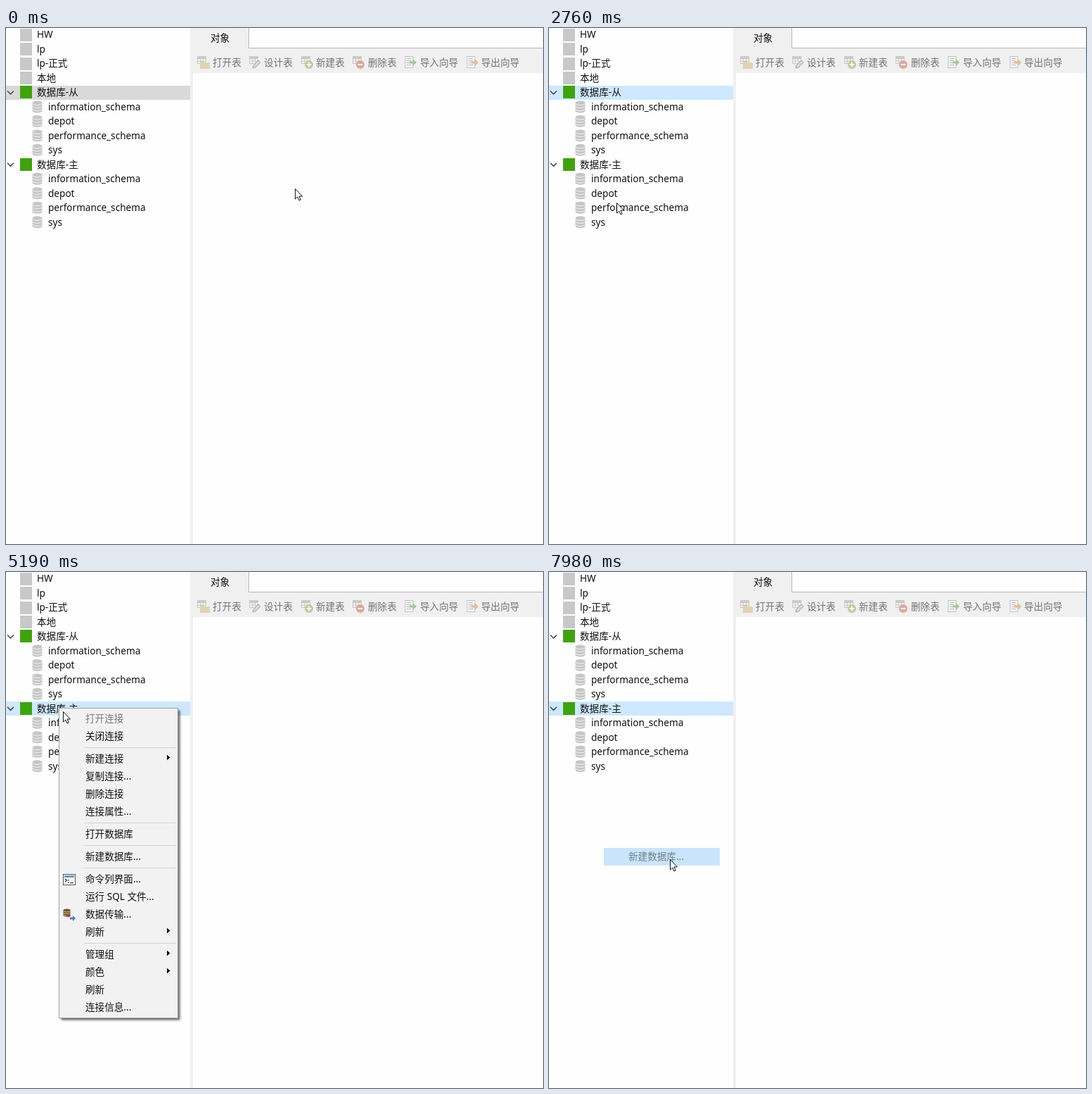
These frames come from a looping animation (764 px wide and 733 px high, 8 s). An HTML page with a canvas:

```html
<!DOCTYPE html>
<html lang="zh-CN">
<head>
<meta charset="utf-8">
<title>数据库连接</title>
<style>
  html, body { margin: 0; width: 764px; height: 733px; overflow: hidden; background: #fefefe; }
  canvas { display: block; }
</style>
</head>
<body>
<canvas id="stage" width="764" height="733"></canvas>
<script>
const ctx = document.getElementById('stage').getContext('2d');
const LOOP = 8000, STEP = 77.5;
const FONT_SIZE = 13.6;
const FONT = `${FONT_SIZE}px "Noto Sans", "Noto Sans CJK SC", "Noto Sans CJK", sans-serif`;
const ROW_TOP = 9.6, ROW_H = 20.47;
const MENU_W = 170, ITEM_H = 25, SEP_H = 7, PAD = 3;
const OPEN_DELAY = 240, CLOSE_DELAY = 140, FADE_STEP = 70;

// Pointer strokes: start, end, x, y. It rests between them.
const strokes = [
  [70, 460, 36, 116], [610, 760, 68, 93], [1000, 1380, 112, 186], [1450, 1840, 133, 501],
  [2290, 2910, 88, 195], [3150, 3310, 111, 238], [3380, 3710, 146, 526], [3780, 4090, 158, 590],
  [4390, 4710, 75, 193], [5110, 5190, 81, 198], [5270, 5880, 150, 366], [5950, 6100, 163, 430],
  [6180, 6340, 163, 372], [6660, 6900, 166, 340], [7050, 7430, 172, 408]
];

function pointerAt(t) {
  const time = Math.floor((t + 36) / STEP) * STEP;
  let x = 411, y = 228;
  for (const [start, end, toX, toY] of strokes) {
    if (t < start) break;
    const f = Math.min(1, (time - start + STEP) / (end - start + STEP));
    x += (toX - x) * f;
    y += (toY - y) * f;
  }
  return [Math.round(x), Math.round(y)];
}

// A menu opens where the pointer was when its row was clicked.
function contextMenu(click, pick) {
  const [x, y] = pointerAt(click);
  const row = Math.round((y - ROW_TOP) / ROW_H);
  return { x, y, row, click, open: click + OPEN_DELAY, pick, close: pick + CLOSE_DELAY };
}
const menus = [contextMenu(760, 2070), contextMenu(2910, 4240), contextMenu(4870, 7770)];

const schemas = ['information_schema', 'depot', 'performance_schema', 'sys'];
const tree = ['HW', 'lp', 'lp-正式', '本地', '数据库-从', ...schemas, '数据库-主', ...schemas];

// "-" is a separator, ">" marks a submenu.
const items = [];
let nextY = PAD;
for (const entry of ['打开连接', '关闭连接', '-', '新建连接>', '复制连接...', '删除连接', '连接属性...', '-',
  '打开数据库', '-', '新建数据库...', '-', '命令列界面...', '运行 SQL 文件...', '数据传输...', '刷新>', '-',
  '管理组>', '颜色>', '刷新', '连接信息...']) {
  const sep = entry === '-';
  items.push({ sep, label: entry.replace('>', ''), sub: entry.endsWith('>'), y: nextY, off: entry === '打开连接' });
  nextY += sep ? SEP_H : ITEM_H;
}
const MENU_H = nextY + PAD;

function rect(x, y, w, h, color) {
  ctx.fillStyle = color;
  ctx.fillRect(x, y, w, h);
}

function text(label, x, y, color = '#111') {
  ctx.font = FONT;
  ctx.fillStyle = color;
  ctx.fillText(label, x, Math.round(y + 4.8));
}

function shape(points, x, y, fill, stroke, width = 1, close = true) {
  ctx.beginPath();
  points.forEach(([px, py]) => ctx.lineTo(x + px, y + py));
  if (close) ctx.closePath();
  if (fill) { ctx.fillStyle = fill; ctx.fill(); }
  if (stroke) { ctx.strokeStyle = stroke; ctx.lineWidth = width; ctx.stroke(); }
}

function disc(x, y, r, color) {
  ctx.fillStyle = color;
  ctx.beginPath();
  ctx.arc(x, y, r, 0, Math.PI * 2);
  ctx.fill();
}

function blockArrow(x, y, size, color) {
  rect(x, y - 1.5, size, 3, color);
  shape([[0, -size], [size, 0], [0, size]], x + size, y, color);
}

function cylinder(x, y, w, h, color, gap) {
  const rx = w / 2, ry = w / 5;
  ctx.fillStyle = color;
  ctx.beginPath();
  ctx.ellipse(x, y - h / 2 + ry, rx, ry, 0, Math.PI, 0);
  ctx.ellipse(x, y + h / 2 - ry, rx, ry, 0, 0, Math.PI);
  ctx.fill();
  ctx.strokeStyle = gap;
  ctx.lineWidth = 1;
  for (let i = 0; i < 3; i++) {
    ctx.beginPath();
    ctx.ellipse(x, y - h / 2 + ry + i * h * 0.24 + 0.5, rx, ry, 0, 0, Math.PI);
    ctx.stroke();
  }
}

function drawTree(t) {
  const active = menus.filter(m => t >= m.click).pop();
  const selected = active ? active.row : tree.indexOf('数据库-从');
  tree.forEach((label, i) => {
    const y = ROW_TOP + i * ROW_H;
    if (i === selected) rect(0, Math.ceil(y - 10), 262, 20, active ? '#cde8ff' : '#d9d9d9');
    if (schemas.includes(label)) {
      cylinder(44.5, y, 14, 17, '#c6c6c6', '#f6f6f6');
      text(label, 60, y);
      return;
    }
    const server = label.startsWith('数据库');
    rect(20, Math.round(y - 9), 17, 18, server ? '#3fa30f' : '#c8c8c8');
    text(label, 44, y);
    if (server) shape([[-4.5, -2], [0, 2.5], [4.5, -2]], 6.5, y, null, '#444', 1.5, false);
  });
}

function grid(x) {
  rect(x, 40, 13, 11, '#c9c9c9');
  for (let i = 0; i < 6; i++) rect(x + 1 + (i % 3) * 4, 44 + (i > 2) * 3.5, 3, 2.5, '#f3f3f3');
}

function openIcon(x) {
  grid(x);
  rect(x + 4, 47, 6, 3, '#d5c9ad');
  rect(x + 4, 49, 14, 9, '#e0d3b4');
}

function designIcon(x) {
  grid(x);
  shape([[0, 10], [1, 6], [8, -1], [11, 2], [4, 9]], x + 5, 47, '#d9d9d9', '#a5a5a5');
}

function badgeIcon(x, color, plus) {
  grid(x);
  disc(x + 11, 52, 6, color);
  rect(x + 7.5, 51, 7, 2, '#f5f5f5');
  if (plus) rect(x + 10, 48.5, 2, 7, '#f5f5f5');
}

function sheetIcon(x, color) {
  rect(x + 0.5, 40, 12, 17, '#c4c4c4');
  rect(x + 1.5, 41, 10, 15, '#f4f4f4');
  for (let y = 43; y < 55; y += 3) rect(x + 3, y, 6, 1, '#bcbcbc');
  blockArrow(x + 7, 49, 5, color);
}

const tools = [
  ['打开表', openIcon],
  ['设计表', designIcon],
  ['新建表', x => badgeIcon(x, '#bccb9c', true)],
  ['删除表', x => badgeIcon(x, '#d9a9a2', false)],
  ['导入向导', x => sheetIcon(x, '#a9c3a0')],
  ['导出向导', x => sheetIcon(x, '#dfbd91')]
];

function drawPanel() {
  rect(262, 0, 4, 733, '#f0f0f0');
  rect(266, 0, 498, 64, '#f0f0f0');
  rect(346, 0, 418, 28, '#fefefe');
  rect(345, 0, 1, 29, '#b8b8b8');
  rect(345, 28, 419, 1, '#b8b8b8');
  text('对象', 291, 14);

  let x = 272;
  for (const [label, icon] of tools) {
    icon(Math.round(x));
    text(label, Math.round(x + 21.5), 49, '#747474');
    x += 33 + label.length * FONT_SIZE;
  }
}

function consoleIcon(x, y) {
  rect(x, y - 8, 18, 16, '#4a5560');
  rect(x + 1, y - 7, 16, 14, '#fafafa');
  rect(x + 2, y - 6, 14, 3, '#6c9cc4');
  shape([[0, 0], [2.5, 2], [0, 4]], x + 3, y - 1, null, '#333', 1.2, false);
  for (const dy of [0, 3]) rect(x + 7, y + dy, 1.5, 1.5, '#333');
  rect(x + 10, y + 4, 5, 1.2, '#333');
}

function transferIcon(x, y) {
  cylinder(x + 5.5, y - 3, 10, 11, '#6b5536', '#c9bd92');
  blockArrow(x + 5, y + 1, 3, '#a83a35');
  blockArrow(x + 10, y + 5, 4, '#3f86bd');
}

const menuIcons = { '命令列界面...': consoleIcon, '数据传输...': transferIcon };

function hoveredItem(menu, [px, py]) {
  const x = px - menu.x, y = py - menu.y;
  if (x < PAD || x > MENU_W - PAD) return undefined;
  return items.find(i => !i.sep && !i.off && y >= i.y && y < i.y + ITEM_H);
}

function drawItem(menu, item, hot) {
  const x = menu.x, y = menu.y + item.y;
  if (item.sep) return rect(x + 36, y + 3, 131, 1, '#d3d3d3');
  const mid = y + ITEM_H / 2;
  if (hot) rect(x + PAD, y, 165, ITEM_H, '#91c9f7');
  text(item.label, x + 38, mid, item.off ? '#7b7b7b' : '#111');
  if (item.sub) shape([[0, -4], [4.5, 0], [0, 4]], x + 154, mid - 2, hot ? '#fff' : '#111');
  const icon = menuIcons[item.label];
  if (icon) icon(x + 6, Math.round(mid));
}

function drawMenu(menu, pointer) {
  ctx.save();
  ctx.shadowColor = 'rgba(0,0,0,.6)';
  ctx.shadowBlur = 3;
  ctx.shadowOffsetX = ctx.shadowOffsetY = 2.5;
  rect(menu.x, menu.y, MENU_W, MENU_H, '#a2a2a2');
  ctx.restore();
  rect(menu.x + 1, menu.y + 1, MENU_W - 2, MENU_H - 2, '#f2f2f2');
  const hot = hoveredItem(menu, pointer);
  items.forEach(item => drawItem(menu, item, item === hot));
}

// The chosen entry lingers and fades after its menu closes.
function drawPicked(menu, age) {
  ctx.globalAlpha = 0.48 ** Math.floor(age / FADE_STEP);
  drawItem(menu, hoveredItem(menu, pointerAt(menu.pick)), true);
  ctx.globalAlpha = 1;
}

function drawPointer([x, y]) {
  shape([[0.5, 0.5], [0.5, 15], [3.8, 12], [6, 17], [8.2, 16], [6, 11], [10.5, 11]], x, y, '#fff', '#111');
}

function draw(t) {
  const pointer = pointerAt(t);
  rect(0, 0, 764, 733, '#fefefe');
  drawTree(t);
  drawPanel();
  for (const menu of menus) {
    const age = t - menu.close;
    if (t >= menu.open && age < 0) drawMenu(menu, pointer);
    else if (age >= 0 && age < 3 * FADE_STEP) drawPicked(menu, age);
  }
  const within = (from, to) => t >= from && t < to;
  const pressed = menus.some(m => within(m.click, m.open) || within(m.pick, m.close));
  if (pressed) disc(pointer[0], pointer[1] + 1, 13.5, 'rgba(228,224,30,.6)');
  drawPointer(pointer);
}

function tick(now) {
  draw(now % LOOP);
  requestAnimationFrame(tick);
}
draw(0);
requestAnimationFrame(tick);
</script>
</body>
</html>
```
